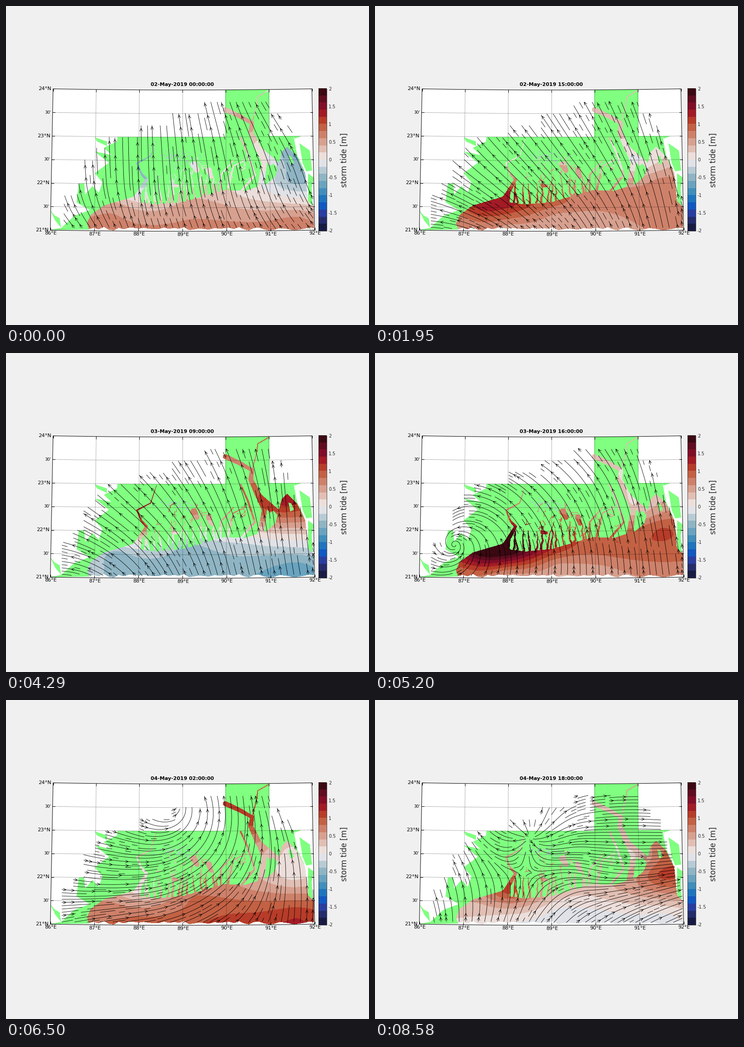
Recreate the animation shown at these times as a matplotlib script. Size 798 by 702 pixels, loop 8710 ms.

```python
import numpy as np
import matplotlib.pyplot as plt
from matplotlib.animation import FuncAnimation
from matplotlib.patches import Polygon, Rectangle
from matplotlib.path import Path

W, H, DPI = 798, 702, 100
HOURS, STEP_MS = 67, 130
KEYS = [0, 7, 23, 33, 40, 50, 66]
GREEN = "#80ff80"
BALANCE = """181c43 242c6b 293ea0 1158c3 1e75be 408ebb 69a3bf 8fb5c4 b8cbd4 e0e2e7
ecdeda e1bfb4 d7a08f ce816a c36144 b73c29 a31b25 820e28 600d20 3c0912""".split()
RGBA = np.array([plt.matplotlib.colors.to_rgba("#" + c) for c in BALANCE])

# x, y, then the water level in metres at each key hour
WEST = [
    (184, 470, .62, -.25, -.3, -.25, 1, .7, .25),
    (240, 440, .5, -.1, -.3, -.45, 2, .55, .5),
    (290, 484, .62, -.58, .08, -.5, .65, .85, .05),
    (296, 418, 0, .1, -.85, .05, 2.3, .1, 1.1),
    (400, 465, .58, -.5, .06, -.5, .6, .85, -.05),
    (400, 425, .4, -.3, -.2, -.45, 1.2, .75, .35),
    (296, 360, -.6, 1.1, -.1, 1.3, .9, .15, .5),
]
EAST = [
    (500, 480, .63, -.58, .08, -.5, .5, 1.05, -.12),
    (530, 415, .15, 0, -.42, -.15, 1, .6, .4),
    (640, 470, .66, -.7, .05, -.68, .75, 1.15, 0),
    (630, 385, -.45, .55, -.75, .4, 1, .1, 1.05),
    (620, 325, -.55, 1.25, -.15, 1.3, .35, .2, .7),
    (572, 345, .05, .75, .1, 1, .25, .35, .2),
    (535, 265, .48, .42, .8, .65, .2, 1.1, .3),
]

MAIN = [(245, 288), (482, 288), (482, 183), (579, 184), (579, 286), (632, 286),
        (640, 328), (656, 362), (600, 400), (480, 425), (260, 445), (215, 450),
        (183, 492), (97, 493), (122, 488), (150, 462), (184, 449), (155, 432),
        (160, 391), (172, 390), (174, 415), (190, 396), (204, 411), (212, 388),
        (195, 368), (226, 345), (195, 320), (232, 328), (215, 312), (244, 298)]
SOUTHWEST = [(97, 449), (107, 461), (118, 467), (121, 488), (108, 472)]
NORTHWEST = [(195, 289), (222, 298), (222, 308), (200, 298)]
NORTHEAST = [(632, 286), (650, 286), (634, 292)]
EAST_COAST = [(645, 302), (668, 318), (673, 362), (660, 364), (652, 345)]
SPIT = [(664, 368), (677, 378), (672, 400), (677, 490), (675, 443), (664, 443)]
ISLAND = [(577, 354), (588, 347), (597, 357), (582, 386)]
SHORE = [(178, 478), (186, 460), (215, 439), (280, 420), (299, 396), (296, 432),
         (330, 437), (390, 431), (480, 405), (525, 407), (572, 392), (592, 375),
         (606, 322), (618, 309), (640, 332), (658, 368), (664, 430), (677, 443)]

# start width, end width, course
RIVERS = [
    (11, 8, [(482, 228), (515, 243), (541, 258)]),
    (9, 18, [(541, 258), (538, 278), (556, 316), (592, 350)]),
    (9, 14, [(550, 305), (568, 346), (560, 398)]),
    (2, 2, [(541, 258), (552, 215), (553, 200), (577, 186)]),
    (4, 5, [(516, 290), (532, 326), (547, 372), (515, 410)]),
    (10, 5, [(290, 415), (309, 382), (298, 370)]),
    (4, 1, [(298, 370), (288, 346), (318, 330), (331, 291)]),
    (5, 2, [(472, 408), (472, 372), (500, 340)]),
    (5, 2, [(487, 408), (500, 352), (523, 341)]),
    (15, 11, [(413, 349), (420, 362)]),
    (13, 9, [(446, 361), (451, 376)]),
    (9, 6, [(368, 394), (377, 396)]),
]

# wind bearing (degrees from east) on a 3 x 4 lattice at each key hour
WX, WY = [130, 300, 470, 630], [250, 380, 480]
BEARING = [
    [90, 90, 106, 128, 95, 92, 98, 108, 130, 107, 112, 128],
    [105, 115, 108, 92, 125, 127, 117, 93, 155, 138, 130, 95],
    [130, 140, 130, 118, 175, 145, 138, 116, 195, 150, 115, 110],
    [130, 132, 115, 92, 155, 137, 112, 93, 170, 128, 105, 100],
    [160, 155, 130, 100, 260, 122, 107, 100, -5, 80, 91, 97],
    [-20, -15, 80, 118, -15, 5, 45, 95, 10, 8, 32, 86],
    [130, 120, 8, -5, 115, 100, -14, 8, 100, 68, 34, 25],
]
WIND = np.exp(1j * np.radians(BEARING)).reshape(len(KEYS), 3, 4)

# limits of the wind domain, row by row downwards
LEFT = [437, 365, 292, 219, 195, 171, 171, 147, 122]
RIGHT = [580, 605, 629, 631, 642, 653, 660, 672, 676]


def project(lon, lat):
    u = (np.asarray(lon, float) - 89) / 3
    south = 24 - np.asarray(lat, float)
    return 388 + u * (284.5 + 2 * south), 182.3 + 103.6 * south + 2.6 * (1 - u ** 2)


# ---- water mask and level weights ----
X0, X1, Y0, Y1 = 97, 680, 182, 497
rng = np.random.default_rng(5)
gx, gy = np.meshgrid(np.arange(X0, X1) + .5, np.arange(Y0, Y1) + .5)
bottom = np.arange(677, 180, -11)
ragged = np.c_[bottom, np.clip(rng.normal(491, 2.5, len(bottom)), 486, 494)]
sea = np.vstack([SHORE, ragged])
water = Path(sea).contains_points(np.c_[gx.ravel(), gy.ravel()]).reshape(gx.shape)


def carve(w0, w1, pts):
    pts = np.array(pts, float)
    s = np.r_[0, np.cumsum(np.hypot(*np.diff(pts, axis=0).T))]
    t = np.arange(0, s[-1], .7)
    for x, y, w in zip(np.interp(t, s, pts[:, 0]), np.interp(t, s, pts[:, 1]),
                       np.linspace(w0, w1, len(t))):
        i, j, r = int(x) - X0, int(y) - Y0, int(w / 2) + 2
        box = np.s_[max(j - r, 0):j + r + 1, max(i - r, 0):i + r + 1]
        water[box] |= np.hypot(gx[box] - x, gy[box] - y) <= max(w / 2, .6)


for river in RIVERS:
    carve(*river)
for x in np.linspace(306, 462, 14) + rng.normal(0, 2, 14):
    base = 439 - max(x - 385, 0) * .3
    y = np.linspace(base, base - rng.uniform(38, 72), 9)
    carve(rng.uniform(3.5, 6), 1, np.c_[x + rng.normal(0, 1.8, 9).cumsum(), y])
for _ in range(26):
    walk = rng.normal((1, -2), 4, (6, 2)).cumsum(0)
    carve(1, 1, rng.uniform((345, 350), (535, 402)) + walk)

stations = np.array(WEST + EAST)
spots, levels = stations[:, :2], stations[:, 2:].T
n = len(stations)


def kernel(p, q):
    d = (p[:, None] - q[None]) * (1, 1.6)
    return np.sqrt((d ** 2).sum(-1) + 300)


system = np.ones((n + 1, n + 1))
system[:n, :n] = kernel(spots, spots)
system[n, n] = 0
wet = np.c_[gx[water], gy[water]]
weights = np.c_[kernel(wet, spots), np.ones(len(wet))] @ np.linalg.inv(system)[:, :n]


def tide_basis(hour):
    a = 2 * np.pi * np.asarray(hour, float) / 12.42
    return np.stack([np.cos(a), np.sin(a), np.ones_like(a)], -1)


harmonics = np.linalg.lstsq(tide_basis(KEYS), levels, rcond=None)[0]
residual = levels - tide_basis(KEYS) @ harmonics


def at_keys(hour):
    return np.array([np.interp(hour, KEYS, row) for row in np.eye(len(KEYS))])


def tide_image(hour):
    eta = weights @ (tide_basis(hour) @ harmonics + at_keys(hour) @ residual)
    img = np.zeros(water.shape + (4,))
    img[water] = RGBA[np.clip(np.floor((eta + 2) / .2), 0, 19).astype(int)]
    return img


# ---- wind and streamlines ----
AX, AY, CELL = 100, 190, 2
fx, fy = np.arange(AX, 700, CELL) + 1., np.arange(AY, 510, CELL) + 1.
place = fx[None] + 1j * fy[:, None]
hat_x = np.array([np.interp(fx, WX, row) for row in np.eye(len(WX))])
hat_y = np.array([np.interp(fy, WY, row) for row in np.eye(len(WY))])
row = np.clip((fy - 210) // 25.7, 0, len(LEFT) - 1).astype(int)
inside = (fx >= np.take(LEFT, row)[:, None]) & (fx <= np.take(RIGHT, row)[:, None])
inside &= ((fy >= 210) & (fy < 490))[:, None]

COLS, LINES = 42, 45


def cell_of(p, w=14, h=7):
    return ((p.imag - AY) // h * COLS + (p.real - 108) // w).astype(int)


def lookup(field, p):
    return field[((p.imag - AY) / CELL).astype(int), ((p.real - AX) / CELL).astype(int)]


sc, sr = np.meshgrid(np.arange(COLS), np.arange(LINES))
rim = np.minimum(np.minimum(sc, COLS - 1 - sc), np.minimum(sr, LINES - 1 - sr))
seeds = (108 + 14 * (sc + .5) + 1j * (AY + 7 * (sr + .5))).ravel()
seeds = seeds[np.argsort(rim.ravel(), kind="stable")]
seeds = seeds[(seeds.imag < 505) & (seeds.real < 695)]
seeds = seeds[lookup(inside, seeds)]


def swirl(field, centre, turn, weight, radius):
    d = np.conj(place - centre)
    r = np.abs(d) + 1e-6
    w = weight * np.exp(-(r / radius) ** 2)
    return np.where(r < 4, 0, field * (1 - w) + w * d / r * np.exp(1j * np.radians(turn)))


def wind(hour):
    f = hat_y.T @ np.tensordot(at_keys(hour), WIND, 1) @ hat_x
    f /= np.abs(f) + 1e-9
    times = [30, 40, 50, 60]
    eye = np.interp(hour, times, [80, 174, 368, 560]) \
        + 1j * np.interp(hour, times, [600, 422, 228, 60])
    f = swirl(f, eye, 115, np.interp(hour, [30, 38, 52, 60], [0, 1, 1, 0]), 120)
    if hour > 60:
        f = swirl(f, 340 + 305j, 5, (hour - 60) / 6, 90)
    return np.conj(f / (np.abs(f) + 1e-9))


def trace(field, sign, steps=130, size=3):
    p, alive = seeds.copy(), np.ones(len(seeds), bool)
    path, count = [p], np.ones(len(seeds), int)
    for _ in range(steps):
        p = np.where(alive, p + sign * size * lookup(field, p), p)
        alive = alive & lookup(inside, p)
        count += alive
        path.append(p)
    path = np.array(path).T
    return path, cell_of(path), count


def clear_run(path, cells, count, used):
    hit = used[cells[:count]]
    return path[:hit.argmax() if hit.any() else count]


def streamlines(hour):
    field = wind(hour)
    ways = trace(field, 1), trace(field, -1)
    used, marked = np.zeros(COLS * 60, bool), set()
    out, heads, gap = [], [], [complex(np.nan, np.nan)]
    turn = np.exp(.45j)
    for s in range(len(seeds)):
        if used[ways[0][1][s, 0]]:
            continue
        fore, aft = (clear_run(*(a[s] for a in way), used) for way in ways)
        line = np.r_[aft[::-1], fore[1:]]
        if len(line) < 4:
            continue
        used[cell_of(line)] = True
        out += [line, gap]
        boxes = cell_of(line, 40, 28)
        for j in range(3, len(line), 3):
            d = line[j] - line[j - 1]
            if boxes[j] not in marked and abs(d) > 0:
                marked.add(boxes[j])
                arm = -6.5 * d / abs(d)
                heads += [[line[j] + arm * turn, line[j], line[j] + arm / turn], gap]
    p = np.concatenate(out + heads)
    return p.real, p.imag


# ---- static picture ----
plt.rcParams["font.family"] = "DejaVu Sans"
fig = plt.figure(figsize=(W / DPI, H / DPI), dpi=DPI, facecolor="#f0f0f0")
ax = fig.add_axes([0, 0, 1, 1])
ax.axis("off")


def px(size):
    return size * 72 / DPI


def label(x, y, s, size, **kw):
    kw = {"ha": "center", "va": "center", **kw}
    return ax.text(x, y, s, fontsize=px(size), **kw)


lons, lats = np.linspace(86, 92, 61), np.linspace(21, 24, 31)
edge = np.hstack([project(lons, 24), project(92, lats[::-1]),
                  project(lons[::-1], 21), project(86, lats)]
                 if False else
                 [np.broadcast_arrays(*project(lons, 24 + 0 * lons)),
                  np.broadcast_arrays(*project(92 + 0 * lats, lats[::-1])),
                  np.broadcast_arrays(*project(lons[::-1], 21 + 0 * lons)),
                  np.broadcast_arrays(*project(86 + 0 * lats, lats))]).T
ax.add_patch(Polygon(edge, fc="white", ec="none", zorder=0))
ax.add_patch(Polygon(edge, fc="none", ec="black", lw=px(1), zorder=6))


def green(pts, z=1):
    patch = ax.add_patch(Polygon(pts, fc=GREEN, ec="none", zorder=z))
    patch.set_clip_path(Path(edge), ax.transData)


for shape in (MAIN, SOUTHWEST, NORTHWEST, NORTHEAST, EAST_COAST, SPIT):
    green(shape)
green(ISLAND, 3)
green([(621, 329), (627, 331), (633, 345), (625, 349)], 3)
ax.scatter(rng.normal(378, 24, 70), rng.normal(334, 8, 70), s=1.6, marker="s",
           c="#b4bede", lw=0, zorder=1.6)

tide = ax.imshow(tide_image(0), extent=(X0, X1, Y1, Y0), aspect="auto",
                 interpolation="nearest", zorder=2)

dots = dict(color="black", lw=px(.9), ls=(0, (1, 2)), zorder=4)
tick = dict(color="black", lw=px(1), zorder=6)
for lon in range(86, 93):
    if 86 < lon < 92:
        ax.plot(*project(lon + 0 * lats, lats), **dots)
    for lat, dy in ((24, 5), (21, -5)):
        x, y = project(lon, lat)
        ax.plot([x, x], [y, y + dy], **tick)
    label(x + 1, y + 7, f"{lon}°E", 11)
for half in range(7):
    lat = 21 + half / 2
    if 0 < half < 6:
        ax.plot(*project(lons, lat + 0 * lons), **dots)
    for lon, dx in ((92, -5), (86, 5)):
        x, y = project(lon, lat)
        ax.plot([x, x + dx], [y, y], **tick)
    if half % 2:
        label(x - 3, y, "30'", 9, ha="right")
    else:
        label(x - 4, y, f"{lat:.0f}°N", 11.2, ha="right")

ax.imshow(RGBA[::-1, None], extent=(687, 704.5, 495.3, 182.3), aspect="auto",
          interpolation="nearest", zorder=2)
ax.add_patch(Rectangle((687, 182.3), 17.5, 313, fc="none", ec="#262626",
                       lw=px(.8), zorder=3))
for i in range(9):
    label(709, 182.5 + i * 39.12, f"{2 - i / 2:g}", 10, ha="left", color="#262626")
label(743.5, 339, "storm tide [m]", 16.6, rotation=90, color="#262626")

title = label(387.5, 173, "", 11, weight="bold")
flow, = ax.plot([], [], color="black", lw=px(.85), zorder=5)
ax.set_xlim(0, W)
ax.set_ylim(H, 0)


def draw(hour):
    title.set_text(f"{2 + hour // 24:02d}-May-2019 {hour % 24:02d}:00:00")
    tide.set_data(tide_image(hour))
    flow.set_data(*streamlines(hour))
    return title, tide, flow


anim = FuncAnimation(fig, draw, frames=HOURS, interval=STEP_MS, repeat=True,
                     repeat_delay=0)
plt.show()
```
